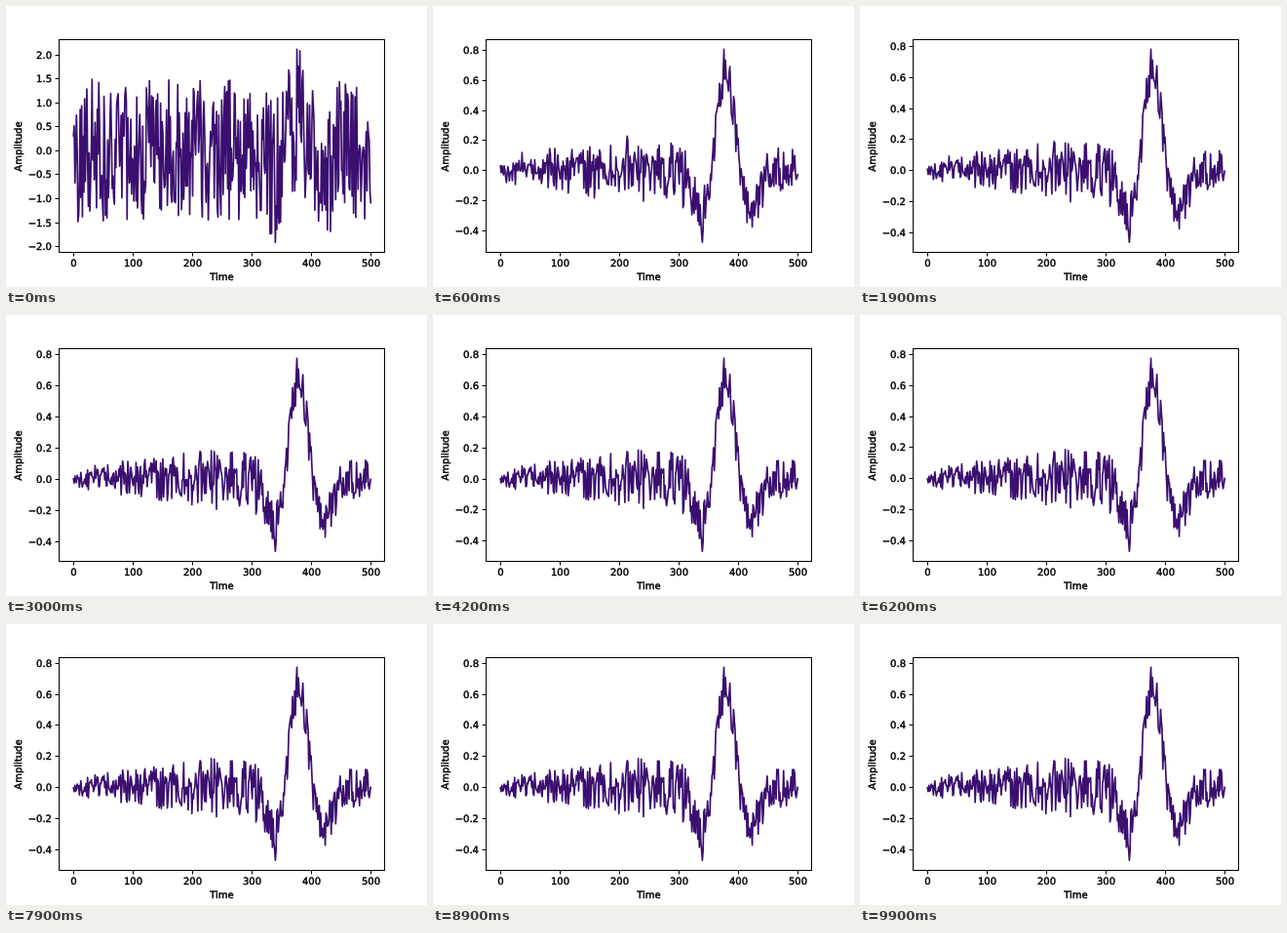
An HTML page that plays this animation: 432 by 288 pixels, repeating every 10 s.

```html
<!DOCTYPE html>
<html lang="en">
<head>
<meta charset="utf-8">
<title>Denoising a signal</title>
<style>
  html, body { margin: 0; width: 100%; height: 100%; overflow: hidden; background: #fff; }
  svg { display: block; width: 432px; height: 288px; }
  text {
    font: 10px "DejaVu Sans", sans-serif; text-anchor: middle;
    text-rendering: geometricPrecision; stroke: #000; stroke-width: .45px;
  }
  #yAxis text { text-anchor: end; }
  .line { fill: none; stroke: #000; stroke-width: 1; }
  #signal { fill: none; stroke: #3b0f70; stroke-width: 1.7; stroke-linejoin: round; stroke-linecap: square; }
</style>
</head>
<body>
<svg viewBox="0 0 432 288">
  <path id="signal"/>
  <rect class="line" x="54.5" y="34.5" width="334" height="218"/>
  <g id="xAxis"></g>
  <g id="yAxis"></g>
  <text x="221.4" y="280.5">Time</text>
  <text transform="translate(15.5 144) rotate(-90)">Amplitude</text>
</svg>
<script>
const COUNT = 400, SPAN = 500, FRAMES = 100, STEP_MS = 100;
const TOP = 34.56, BOTTOM = 252;
const el = id => document.getElementById(id);
const px = x => 69.22 + x * 0.61;
const indexAt = x => Math.round(x / SPAN * (COUNT - 1));
const TROUGH = indexAt(340), PEAK = indexAt(376);

// Seeded random numbers from -1 to 1
function randomizer(seed) {
  return () => {
    seed = (seed + 0x6d2b79f5) | 0;
    let t = Math.imul(seed ^ (seed >>> 15), 1 | seed);
    t = (t + Math.imul(t ^ (t >>> 7), 61 | t)) ^ t;
    return ((t ^ (t >>> 14)) >>> 0) / 2147483648 - 1;
  };
}
const rand = randomizer(42);

function wavelet(x) {
  const s = (x - 379) / 23.5;
  return .64 * (1 - s * s) * Math.exp(-s * s / 2);
}

// Noise that remains: grows with time, smaller from the wavelet on
const spread = x => x < 316 ? .04 + .15 * Math.min(1, x / 240) ** .7 : .135;

const points = Array.from({ length: COUNT }, (_, i) => {
  const x = i * SPAN / (COUNT - 1);
  const start = wavelet(x) + 1.5 * rand();
  const end = wavelet(x) + spread(x) * rand();
  const slow = .06 * rand();
  return { x, end, slow, fast: start - end - slow };
});

function limits(n, fade) {
  const drift = Math.exp(-n / 20);
  return [-.47 + .015 * drift - 1.465 * fade, .77 + .02 * drift + 1.32 * fade];
}

el("xAxis").innerHTML = [0, 100, 200, 300, 400, 500].map(v => {
  const x = Math.round(px(v)) + .5;
  return `<path class="line" d="M${x} 252.5v4"/><text x="${x}" y="267">${v}</text>`;
}).join("");

function draw(n) {
  const fade = .5 ** n, settle = Math.exp(-n / 14);
  const [low, high] = limits(n, fade);
  const pad = (high - low) / 20;
  const scale = (BOTTOM - TOP) / (high - low + 2 * pad);
  const py = v => BOTTOM - (v - low + pad) * scale;

  const values = points.map(p =>
    Math.min(high, Math.max(low, p.end + p.slow * settle + p.fast * fade)));
  values[TROUGH] = low;
  values[PEAK] = high;
  el("signal").setAttribute("d", "M" + points.map((p, i) =>
    px(p.x).toFixed(2) + " " + py(values[i]).toFixed(2)).join("L"));

  const step = high - low > 1.7 ? .5 : .2;
  let ticks = "";
  for (let k = Math.ceil((low - pad) / step); k * step <= high + pad; k++) {
    const y = Math.round(py(k * step));
    const label = (k < 0 ? "\u2212" : "") + Math.abs(k * step).toFixed(1);
    ticks += `<path class="line" d="M54.5 ${y + .5}h-4"/><text x="47" y="${y + 4}">${label}</text>`;
  }
  el("yAxis").innerHTML = ticks;
}

let shown = -1;
function tick() {
  const n = Math.floor(performance.now() / STEP_MS) % FRAMES;
  if (n !== shown) draw(shown = n);
  requestAnimationFrame(tick);
}
tick();
</script>
</body>
</html>
```
